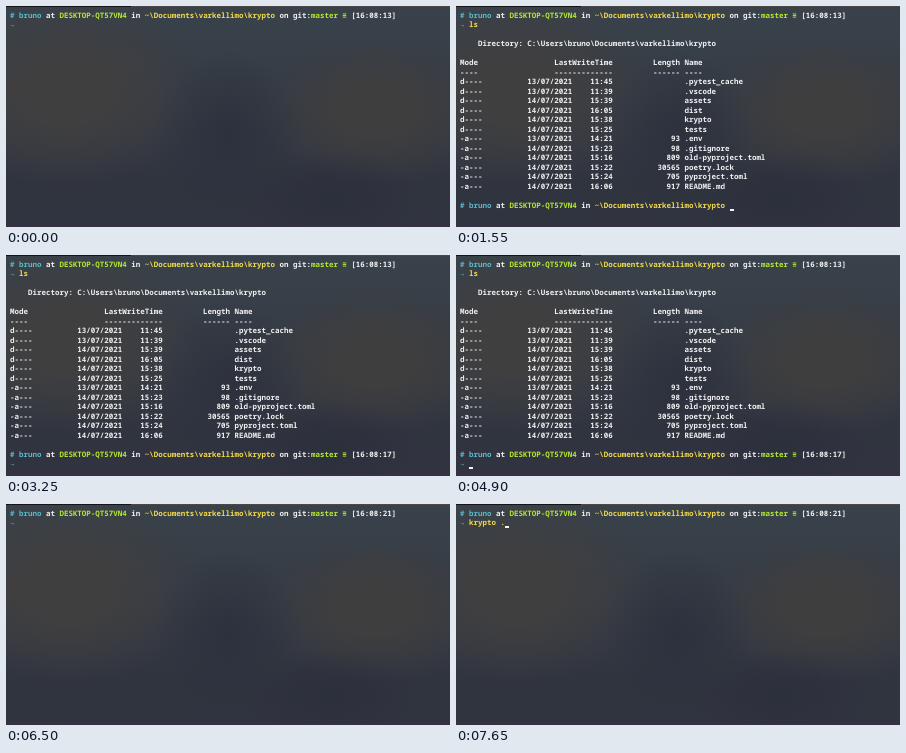
An HTML page that plays this animation: 444x221 px, repeating every 8 s.

```html
<!DOCTYPE html>
<html lang="en">
<head>
<meta charset="utf-8">
<title>Terminal</title>
<style>
  html, body { margin: 0; width: 100%; height: 100%; overflow: hidden; }
  body {
    position: relative;
    background:
      linear-gradient(#0b0c0e, #1c1e22) 0 0 / 125px 1px no-repeat,
      linear-gradient(#4b4848, #4b4848) 0 0 / 100% 1px no-repeat,
      linear-gradient(#3a3044, #3a3044) 0 100% / 100% 2px no-repeat,
      radial-gradient(75px 85px at 222px 130px, #2d313d, #2d313d00),
      radial-gradient(90px 50px at 325px 195px, #2c2f3c, #2c2f3c00),
      radial-gradient(140px 95px at 60px 85px, #403f40 30%, #403f4000),
      radial-gradient(120px 75px at 370px 105px, #3f3e3f 30%, #3f3e3f00),
      linear-gradient(#39424a, #353b45 45%, #30343f 80%, #313440);
  }
  #screen, #cursor { position: absolute; margin: 0; }
  #screen {
    left: 4px; top: 5.8px;
    font: 600 7.49px/9.5px "Noto Sans Mono", "DejaVu Sans Mono", monospace;
    text-rendering: geometricPrecision;
    font-variant-ligatures: none;
    color: #f0f0f0;
    white-space: pre;
  }
  #cursor { width: 4.5px; height: 2px; background: #f4f4f4; }
  .cyan { color: #58b9c9; }
  .lime { color: #b5e92e; }
  .bold { color: #b5e92e; font-weight: 700; }
  .gold { color: #f0d94e; }
</style>
</head>
<body>
<pre id="screen"></pre>
<div id="cursor"></div>
<script>
const CELL = 4.494, ROW = 9.5, LOOP = 8000;
const screenEl = document.getElementById('screen');
const cursorEl = document.getElementById('cursor');

const paint = (cls, text) => `<span class="${cls}">${text}</span>`;

const shortPrompt = paint('cyan', '# bruno') + ' at ' + paint('lime', 'DESKTOP-QT57VN4') +
  ' in ' + paint('gold', '~\\Documents\\varkellimo\\krypto');

const prompt = (sec, typed = '') => shortPrompt + ' on git:' + paint('bold', 'master ≡') +
  ` [16:08:${sec}]\n` + paint('cyan', '→') + ' ' + paint('gold', typed);

// mode, day, time, size, name
const files = [
  ['d', 13, '11:45', '', '.pytest_cache'],
  ['d', 13, '11:39', '', '.vscode'],
  ['d', 14, '15:39', '', 'assets'],
  ['d', 14, '16:05', '', 'dist'],
  ['d', 14, '15:38', '', 'krypto'],
  ['d', 14, '15:25', '', 'tests'],
  ['-a', 13, '14:21', '93', '.env'],
  ['-a', 14, '15:23', '98', '.gitignore'],
  ['-a', 14, '15:16', '809', 'old-pyproject.toml'],
  ['-a', 14, '15:22', '30565', 'poetry.lock'],
  ['-a', 14, '15:24', '705', 'pyproject.toml'],
  ['-a', 14, '16:06', '917', 'README.md'],
];

const tableRow = (mode, written, size, name) =>
  mode + written.padStart(34 - mode.length) + size.padStart(15) + ' ' + name;

const listing = [
  prompt(13, 'ls'), '',
  '    Directory: C:\\Users\\bruno\\Documents\\varkellimo\\krypto', '',
  tableRow('Mode', 'LastWriteTime', 'Length', 'Name'),
  tableRow('----', '-------------', '------', '----'),
  ...files.map(([mode, day, time, size, name]) =>
    tableRow(mode.padEnd(5, '-'), `${day}/07/2021    ${time}`, size, name)),
  '', '',
].join('\n');

const first = prompt(13), listed = listing + prompt(17), last = prompt(21);
const typing = (time, sec, text) => [time, prompt(sec, text), 1, 2 + text.length];

// start time, text, cursor row, cursor column (no column: cursor hidden)
const steps = [
  [0, first],
  [150, first, 1, 2],
  [700, first],
  typing(1350, 13, 'l'),
  typing(1400, 13, 'ls'),
  [1550, listing + shortPrompt, 20, 60],
  [1600, listed, 21, 2],
  [2150, listed],
  [2700, listed, 21, 2],
  [3250, listed],
  [3800, listed, 21, 2],
  [4350, listed],
  [4900, listed, 21, 2],
  [5700, '', 21, 2],
  [5750, shortPrompt, 0, 60],
  [5800, last, 1, 2],
  [6500, last],
  ...[6600, 6900, 6950, 7050, 7150, 7250, 7350, 7500].map((time, i) =>
    typing(time, 21, 'krypto .'.slice(0, i + 1))),
];

let shown;
function frame() {
  const now = performance.now() % LOOP;
  const step = steps.findLast(s => s[0] <= now);
  if (step !== shown) {
    shown = step;
    const [, text, row, col] = step;
    screenEl.innerHTML = text;
    cursorEl.hidden = col === undefined;
    if (!cursorEl.hidden) {
      cursorEl.style.left = 4 + col * CELL + 'px';
      cursorEl.style.top = 12.6 + row * ROW + 'px';
    }
  }
  requestAnimationFrame(frame);
}
frame();
</script>
</body>
</html>
```
